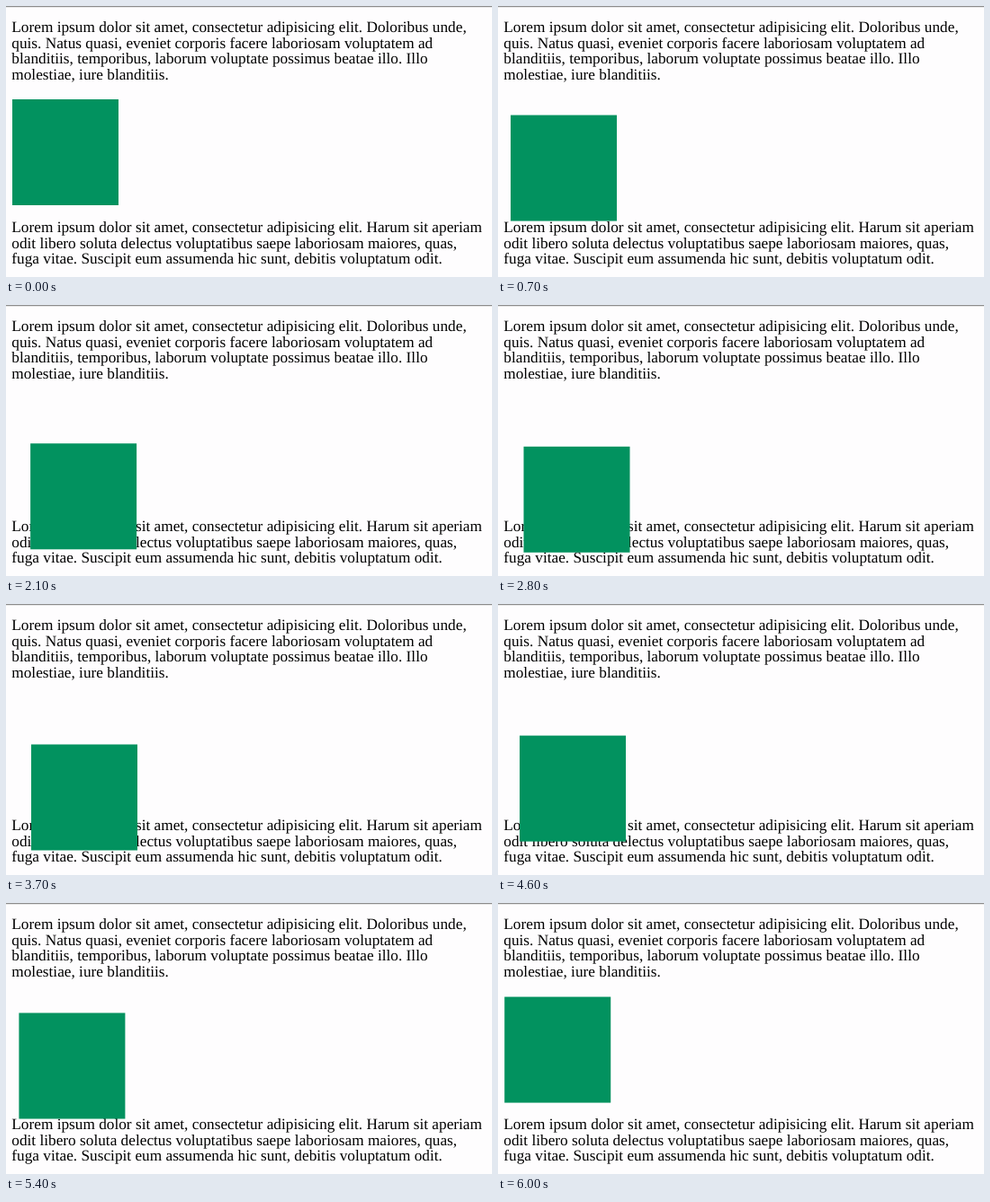
Write an HTML page that moves like this. It is 540x302 px and loops after 6100 ms.

```html
<!DOCTYPE html>
<html lang="la">
<head>
<meta charset="utf-8">
<title>Moving box</title>
<style>
  html, body {
    margin: 0;
    width: 100%;
    height: 100%;
    overflow: hidden;
    background: #fefdfe;
  }
  .edge {
    position: absolute;
    inset: 0 0 auto;
    height: 2px;
    background: linear-gradient(#8c8c8c 50%, #e6e6e6 50%);
  }
  svg {
    position: absolute;
    left: 0;
    top: 0;
    font: 17.28px "Liberation Serif", "Times New Roman", serif;
    font-kerning: none;
    text-rendering: geometricPrecision;
  }
  .box {
    position: absolute;
    left: 6.6px;
    top: 103.5px;
    width: 118.6px;
    height: 118.4px;
    background: #02925f;
    animation: move 6100ms infinite;
  }
  /* ease out to the far point, then the same curve backwards */
  @keyframes move {
    0%, 1% { transform: none; animation-timing-function: ease; }
    50.2% {
      transform: translate(21.6px, 54px);
      animation-timing-function: cubic-bezier(.75, 0, .75, .9);
    }
    99.4%, 100% { transform: none; }
  }
</style>
</head>
<body>
<div class="edge"></div>
<svg width="540" height="302" viewBox="0 0 540 302">
  <text x="6.3" y="29.2">Lorem ipsum dolor sit amet, consectetur adipisicing elit. Doloribus unde,</text>
  <text x="6.3" y="46.7">quis. Natus quasi, eveniet corporis facere laboriosam voluptatem ad</text>
  <text x="6.3" y="64.2">blanditiis, temporibus, laborum voluptate possimus beatae illo. Illo</text>
  <text x="6.3" y="81.7">molestiae, iure blanditiis.</text>
  <text x="6.3" y="252.2">Lorem ipsum dolor sit amet, consectetur adipisicing elit. Harum sit aperiam</text>
  <text x="6.3" y="269.7">odit libero soluta delectus voluptatibus saepe laboriosam maiores, quas,</text>
  <text x="6.3" y="287.2">fuga vitae. Suscipit eum assumenda hic sunt, debitis voluptatum odit.</text>
</svg>
<div class="box"></div>
</body>
</html>
```
